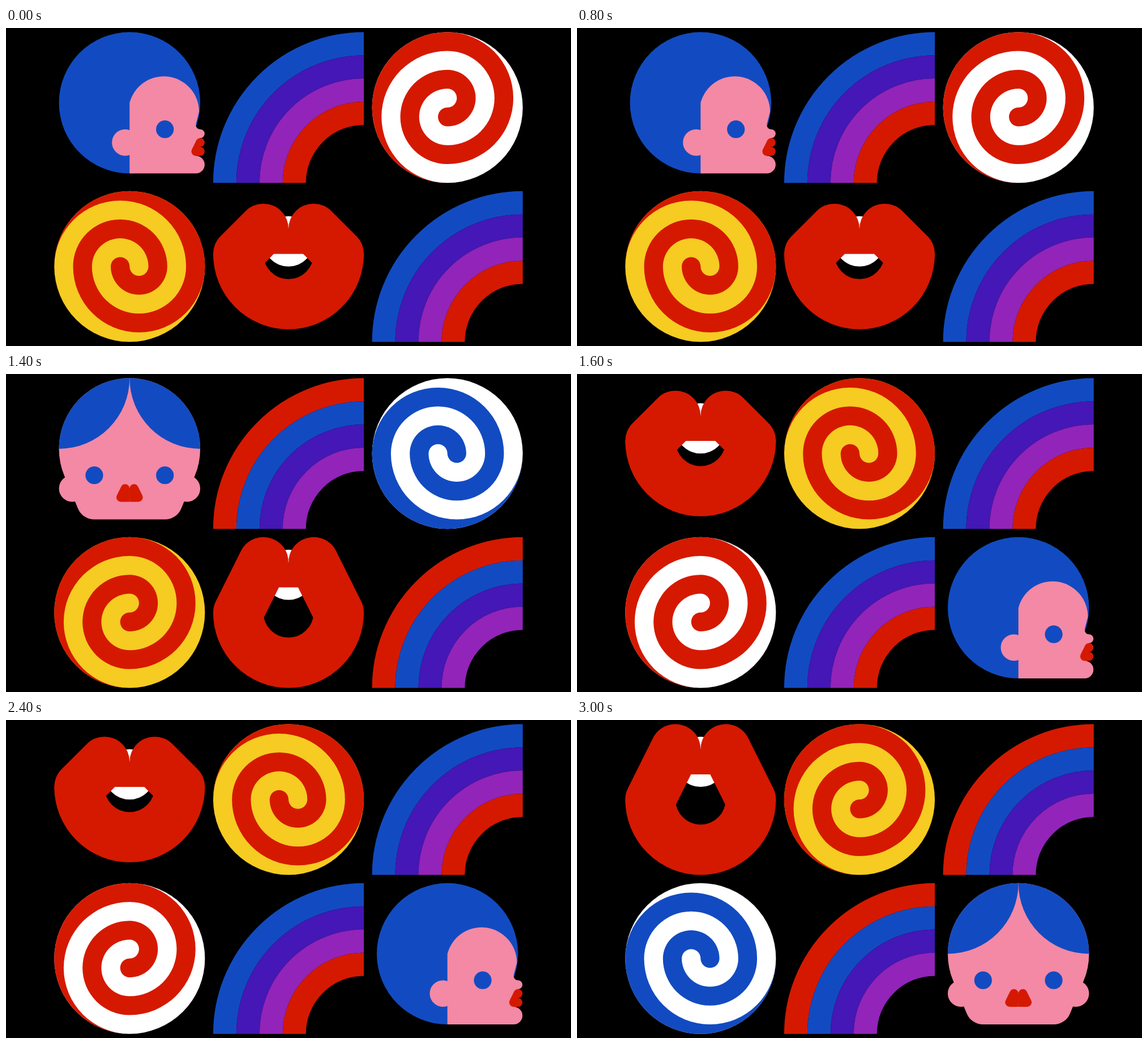
An HTML page with a canvas for the animation above (3.2 s loop, 998 by 561 pixels).

```html
<!DOCTYPE html>
<html lang="en">
<head>
<meta charset="utf-8">
<title>Six tiles</title>
<style>
html, body { margin: 0; width: 100%; height: 100%; overflow: hidden; background: #000; }
canvas { display: block; width: 100vw; height: 100vh; }
</style>
</head>
<body>
<canvas width="998" height="561"></canvas>
<script>
const canvas = document.querySelector('canvas');
const ctx = canvas.getContext('2d');
const BLUE = '#124bc1', VIOLET = '#4417b6', PURPLE = '#9224b9', RED = '#d51900';
const YELLOW = '#f6cb22', PINK = '#f389a5', WHITE = '#fff';
const BANDS = [BLUE, VIOLET, PURPLE, RED];
const STEP = 200, LOOP = 3200;

function shape(d, color) {
  ctx.fillStyle = color;
  ctx.fill(new Path2D(d));
}

function disc(x, y, r, color) {
  ctx.fillStyle = color;
  ctx.beginPath();
  ctx.arc(x, y, r, 0, 2 * Math.PI);
  ctx.fill();
}

function stroke(d, width, color) {
  ctx.lineWidth = width;
  ctx.strokeStyle = color;
  ctx.stroke(new Path2D(d));
}

// Filled shape grown outward by one unit with round corners
function rounded(d, color) {
  ctx.lineJoin = 'round';
  shape(d, color);
  stroke(d, 2, color);
}

// Band of one colour, built from semicircles [radius, sweep, end y]
const SWIRL = 'M0 4' + [
  [3.5, 1, -3], [2.5, 1, 2], [1.5, 1, -1], [.5, 1, 0],
  [.5, 0, 1], [1.5, 0, -2], [2.5, 0, 3], [3.5, 0, -4], [4, 0, 4]
].map(([r, sweep, y]) => `A${r} ${r} 0 0 ${sweep} 0 ${y}`).join('') + 'Z';

function spiral(turns, color, base) {
  ctx.scale(64, 64);
  ctx.rotate(turns * Math.PI / 2);
  disc(0, 0, 4, base);
  shape(SWIRL, color);
}

const whiteSpiral = pose => spiral(pose, BANDS[3 - pose], WHITE);
const yellowSpiral = pose => spiral(pose + 1, RED, YELLOW);

function rainbow(pose) {
  ctx.translate(256, 256);
  for (let i = 0; i < 4; i++) {
    const r = 512 * (12 - 2 * i) / 13;
    stroke(`M${-r} 0A${r} ${r} 0 0 1 0 ${-r}`, 1024 / 13, BANDS[(i + pose) % 4]);
  }
}

function mouth(pose) {
  const open = pose > 1 ? 1 : 0;
  const bump = -3 - open, corner = open - 1, teeth = -1 - open;
  ctx.scale(256 / 6, 256 / 6);
  disc(0, teeth - 1, 2, WHITE);
  stroke(`M-4 ${corner}A4 4 0 0 0 4 ${corner}`, 4, RED);
  ctx.fillStyle = RED;
  ctx.fillRect(-2, bump, 4, teeth - bump);
  ctx.lineCap = 'round';
  for (const side of [-1, 1])
    stroke(`M${2 * side} ${bump}L${4 * side} ${corner}`, 4, RED);
}

function profile() {
  disc(0, 0, 16, BLUE);
  disc(-1, 9, 3, PINK);
  shape('M0 16V0A8 8 0 0 1 15.74 2.02L15.03 4.75A1 1 0 0 0 16 6' +
    'A1 1 0 0 1 16 8L15 12A2 2 0 0 1 15 16Z', PINK);
  disc(8, 6, 2, BLUE);
  disc(16, 9, 1, RED);
  disc(16, 11, 1, RED);
  disc(15, 11, 1, RED);
  shape('M16 8V12H15L14.106 10.553 15.106 8.553Z', RED);
}

function front() {
  shape('M-16 0A16 16 0 0 1 16 0A16 16 0 0 1 14.77 6.15L11.69 13.54' +
    'A4 4 0 0 1 8 16H-8A4 4 0 0 1 -11.69 13.54L-14.77 6.15A16 16 0 0 1 -16 0Z', PINK);
  for (const side of [-1, 1]) {
    ctx.save();
    ctx.scale(side, 1);
    disc(13, 9, 3, PINK);
    shape('M16 0A16 16 0 0 0 0 -16A16 16 0 0 0 16 0Z', BLUE);
    disc(8, 6, 2, BLUE);
    rounded('M1 9L2 11H1Z', RED);
    shape('M0 9H1V12H0Z', RED);
    ctx.restore();
  }
}

function head(pose) {
  ctx.translate(0, -16);
  ctx.scale(pose === 2 ? -15 : 15, 15);
  pose % 2 ? front() : profile();
}

const LAYOUTS = [
  [head, rainbow, whiteSpiral, yellowSpiral, mouth, rainbow],
  [mouth, yellowSpiral, rainbow, whiteSpiral, rainbow, head]
];

function draw() {
  const step = Math.floor(performance.now() % LOOP / STEP);
  ctx.setTransform(canvas.width / 1920, 0, 0, canvas.height / 1080, 0, 0);
  ctx.fillStyle = '#000';
  ctx.fillRect(0, 0, 1920, 1080);
  LAYOUTS[step >> 3].forEach((tile, i) => {
    ctx.save();
    ctx.translate(420 + 540 * (i % 3), i < 3 ? 270 : 810);
    tile(step % 4);
    ctx.restore();
  });
  requestAnimationFrame(draw);
}
draw();
</script>
</body>
</html>
```
